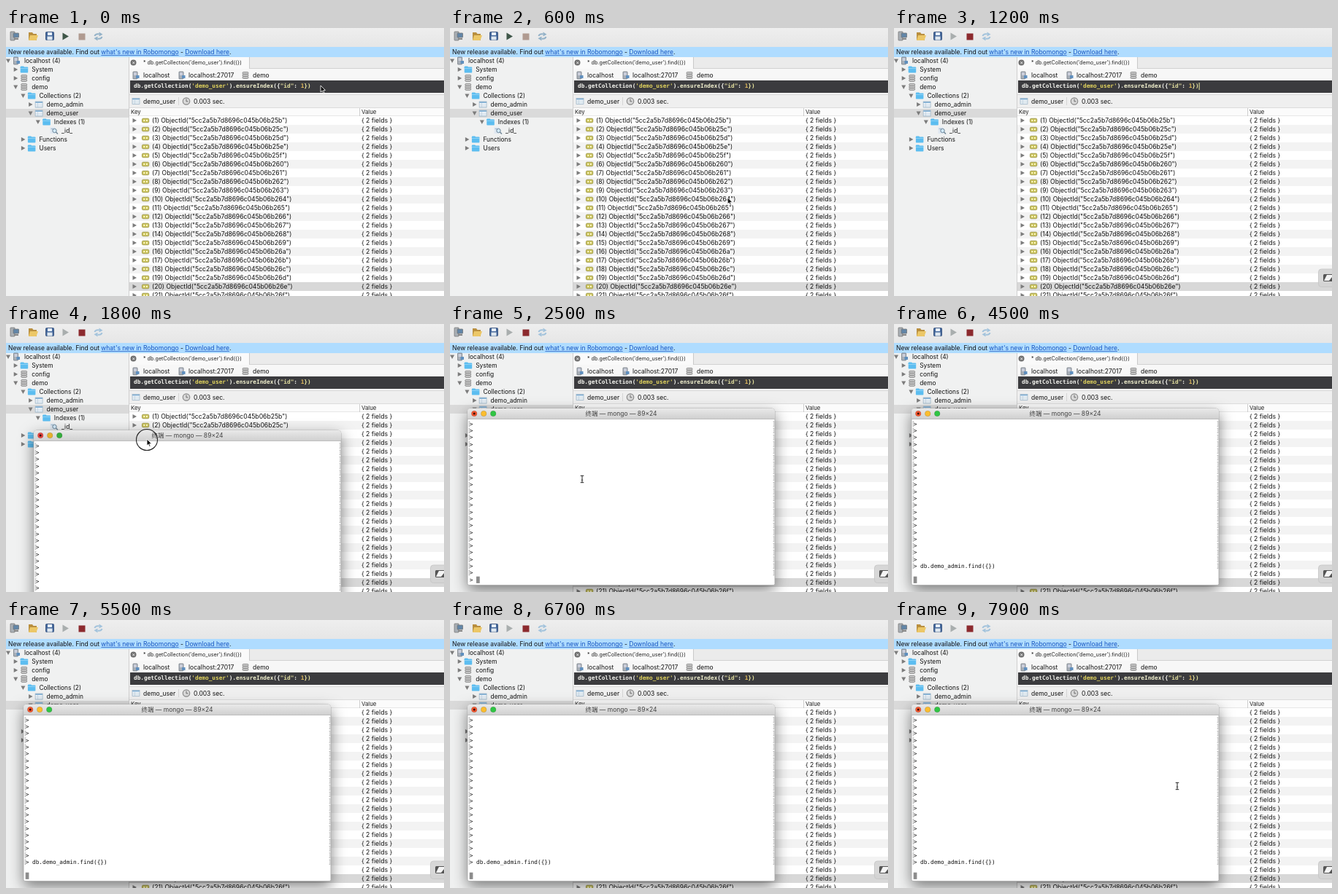
Animation, 600 px wide and 368 px high, one loop 8000 ms. Source, as an HTML page with a canvas:

```html
<!DOCTYPE html>
<html lang="en">
<head>
<meta charset="utf-8">
<style>
  html, body { margin: 0; width: 600px; height: 368px; overflow: hidden; background: #fff; }
  canvas { display: block; }
</style>
</head>
<body>
<canvas id="stage" width="600" height="368"></canvas>
<script>
const ctx = document.getElementById('stage').getContext('2d');
const LOOP = 8000;
const SANS = 'Inter, "Noto Sans CJK SC", "Noto Sans CJK", sans-serif';
const MONO = '"DejaVu Sans Mono", monospace';

function rect(x, y, w, h, color) {
  ctx.fillStyle = color;
  ctx.fillRect(x, y, w, h);
}

function round(x, y, w, h, r, fill, stroke) {
  ctx.beginPath();
  ctx.roundRect(x, y, w, h, r);
  paint(fill, stroke);
}

function circle(x, y, r, fill, stroke, width) {
  ctx.beginPath();
  ctx.arc(x, y, r, 0, 7);
  paint(fill, stroke, width);
}

function poly(points, fill, stroke, width) {
  ctx.beginPath();
  points.forEach(([x, y]) => ctx.lineTo(x, y));
  ctx.closePath();
  paint(fill, stroke, width);
}

function paint(fill, stroke, width = 0.8) {
  if (fill) { ctx.fillStyle = fill; ctx.fill(); }
  if (stroke) { ctx.strokeStyle = stroke; ctx.lineWidth = width; ctx.stroke(); }
}

function vertical(y0, y1, top, bottom) {
  const g = ctx.createLinearGradient(0, y0, 0, y1);
  g.addColorStop(0, top);
  g.addColorStop(1, bottom);
  return g;
}

// Writes a line centred on y and returns its right end.
function text(s, x, y, color = '#111', size = 8.5, family = SANS, weight = '') {
  ctx.font = `${weight} ${size}px ${family}`;
  ctx.fillStyle = color;
  ctx.fillText(s, x, y + size * 0.35);
  return x + ctx.measureText(s).width;
}

function triangle(x, y, open) {
  poly(open ? [[x - 3, y - 2.5], [x + 3, y - 2.5], [x, y + 3]]
            : [[x - 2.5, y - 3], [x + 3, y], [x - 2.5, y + 3]], '#7c7c7c');
}

const icons = {
  folder(x, y, color = '#5cbdf0') {
    round(x - 5, y - 4.5, 5, 3, 1, color);
    round(x - 5, y - 3.5, 10.5, 8, 0.8, color);
    rect(x - 5, y - 2, 10.5, 0.7, 'rgba(255,255,255,.45)');
  },
  server(x, y) {
    round(x - 4, y - 5, 6, 10, 0.6, '#a9b0b8', '#757d86');
    rect(x - 3, y - 3.5, 4, 1, '#eef');
    rect(x - 3, y - 1.5, 4, 1, '#eef');
    rect(x, y, 4.5, 4, '#5f8fbe');
  },
  db(x, y) {
    for (const dy of [2.6, -0.4, -3.4]) round(x - 4, y + dy - 1.2, 8, 3, 1.4, '#c4c4c4', '#858585');
  },
  table(x, y) {
    rect(x - 5, y - 4, 10, 8, '#f3f8fc');
    rect(x - 5, y - 4, 10, 2, '#85b2d6');
    for (let i = 0; i < 3; i++) rect(x - 5, y - 0.3 + i * 2, 10, 0.6, '#b4c8d8');
    rect(x - 2, y - 2, 0.6, 6, '#b4c8d8');
    ctx.strokeStyle = '#9cb4c6';
    ctx.lineWidth = 0.7;
    ctx.strokeRect(x - 5, y - 4, 10, 8);
  },
  index(x, y) {
    rect(x - 5, y - 5, 7, 9, '#dfe8f1');
    rect(x - 4, y - 3, 4, 0.8, '#8aa8c6');
    circle(x + 1, y, 2.7, '#d3ebfb', '#6f8799', 1);
    poly([[x + 3, y + 2], [x + 5.5, y + 4.5]], null, '#6f8799', 1.5);
  },
  tag(x, y) {
    round(x - 4.6, y - 2.8, 9.4, 5.6, 1.5, '#c9c257', '#98924a');
    rect(x - 2.6, y - 1.1, 1.8, 2.2, '#fffbd0');
    rect(x + 1, y - 1.1, 1.8, 2.2, '#fffbd0');
  },
  clock(x, y) {
    circle(x, y, 4.7, '#d9d9d9', '#8a8a8a', 1.2);
    rect(x - 0.4, y - 3, 0.8, 3.4, '#555');
    rect(x, y, 2.4, 0.8, '#555');
  }
};

function toolbar(active) {
  rect(0, 0, 600, 26, vertical(0, 26, '#eeeeee', '#e6e6e6'));
  round(6, 5, 6, 12, 0.6, '#aab0b6', '#777');
  round(10, 7, 7.5, 6, 0.6, '#6286a8', '#777');
  rect(11, 14, 6, 2, '#888');
  poly([[31, 6], [36, 6], [37.5, 8], [42, 8], [42, 17], [31, 17]], '#b98f3f');
  poly([[33, 10], [44, 10], [41.5, 17], [31, 17]], '#ecc767');
  round(54.5, 5.5, 11, 11, 1, '#44679a', '#2c4a77');
  rect(57, 6, 6, 4, '#e8f0fa');
  rect(56.5, 11.5, 7, 5, '#dfe8f0');
  poly([[77.5, 6.5], [86, 11.5], [77.5, 16.5]], active ? '#3f5648' : '#a9aeae');
  rect(99.5, 7.5, 9, 9, active ? '#b09a90' : '#8c2a2e');
  const color = active ? '#94b2c8' : '#a3c3dc';
  for (const s of [1, -1]) {
    ctx.save();
    ctx.translate(126.5, 11.5);
    ctx.scale(s, s);
    ctx.beginPath();
    ctx.moveTo(-5, -0.5);
    ctx.quadraticCurveTo(-4, -4, 1, -3.2);
    paint(null, color, 2);
    poly([[1, -6], [6, -2.8], [1, 0]], color);
    ctx.restore();
  }
}

function notice() {
  rect(0, 26, 600, 14, '#afdcff');
  const link = (s, x) => {
    const end = text(s, x, 32.8, '#1554c0');
    rect(x, 37, end - x, 0.7, '#1554c0');
    return end;
  };
  let x = text('New release available. Find out ', 3, 32.8);
  x = link("what's new in Robomongo", x);
  x = text(' - ', x, 32.8);
  x = link('Download here', x);
  text('.', x, 32.8);
}

// depth, label, icon, state: 1 open, 0 closed, -1 leaf
const tree = [
  [0, 'localhost (4)', 'server', 1],
  [1, 'System', 'folder', 0],
  [1, 'config', 'db', 0],
  [1, 'demo', 'db', 1],
  [2, 'Collections (2)', 'folder', 1],
  [3, 'demo_admin', 'table', 0],
  [3, 'demo_user', 'table', 1],
  [4, 'Indexes (1)', 'folder', 1],
  [5, '_id_', 'index', -1],
  [2, 'Functions', 'folder', 0],
  [2, 'Users', 'folder', 0]
];

function sidebar() {
  rect(0, 40, 168, 328, '#f0f1f1');
  rect(0, 111, 168, 12, '#dadada');
  tree.forEach(([depth, label, icon, state], i) => {
    const x = 3 + depth * 10.2, y = 45 + i * 12;
    if (state >= 0) triangle(x, y, state);
    icons[icon](x + 11.5, y);
    text(label, x + 22, y, '#111', 8.4);
  });
  rect(168, 40, 1, 328, '#cfcfcf');
}

function query(caret) {
  rect(169, 40, 431, 16, '#ebebeb');
  rect(169, 40, 164, 16, '#fafafa');
  rect(333, 40, 0.8, 16, '#c2c2c2');
  rect(333, 55, 267, 0.8, '#cccccc');
  circle(174.5, 47.5, 4, '#707070');
  text('×', 172.2, 47.5, '#fff', 7.5);
  text("* db.getCollection('demo_user').find({})", 188, 47, '#222', 7.2);

  rect(169, 56, 431, 38, '#f7f7f7');
  icons.server(178, 65);
  text('localhost', 188, 65);
  icons.server(241, 65);
  text('localhost:27017', 250, 65);
  icons.db(328, 65);
  text('demo', 338, 65);

  rect(170, 72, 430, 17, '#3b3b3e');
  const code = [
    ['db.getCollection(', '#f6f6f0'], ["'demo_user'", '#e2d45e'], [').', '#f6f6f0'],
    ['ensureIndex', '#f3f2cf'], ['({', '#f6f6f0'], ['"id"', '#e4e0a0'],
    [': ', '#f6f6f0'], ['1', '#e0b95c'], ['})', '#ece9a0']
  ];
  let x = 175;
  for (const [s, color] of code) x = text(s, x, 79.5, color, 7.76, MONO, 'bold');
  if (caret) rect(x, 75, 1, 10, '#e8e8a0');
}

function results() {
  rect(169, 91, 431, 18, '#efefef');
  rect(169, 91, 431, 0.8, '#d2d2d2');
  icons.table(178, 100.5);
  text('demo_user', 188, 100.7);
  rect(236, 95, 0.8, 11, '#d0d0d0');
  icons.clock(247, 100.5);
  text('0.003 sec.', 257, 100.7);

  rect(169, 109, 431, 12, '#fbfbfb');
  rect(169, 109, 431, 0.7, '#d0d0d0');
  rect(169, 120.5, 431, 0.7, '#d4d4d4');
  rect(484, 110, 0.8, 11, '#c6c6c6');
  text('Key', 171, 115, '#222', 7.8);
  text('Value', 487, 115, '#222', 7.8);
  for (let i = 0; i < 21; i++) {
    const y = 127 + i * 12;
    rect(169, y - 6, 431, 12, i === 19 ? '#d8d8d8' : i % 2 ? '#f3f3f3' : '#ffffff');
    triangle(176, y, false);
    icons.tag(191, y);
    const id = '5cc2a5b7d8696c045b06b' + (0x25b + i).toString(16);
    text(`(${i + 1}) ObjectId("${id}")`, 200, y, '#111', 8.65);
    text('{ 2 fields }', 487, y, '#111', 8.65);
  }
}

function badge() {
  round(581.5, 331, 30, 24.5, 4, 'rgba(212,212,212,.9)', '#c4c4c4');
  round(588, 338, 16, 10, 1.5, '#555');
  poly([[593, 339], [600, 339], [600, 342], [596, 347], [589, 347]], '#f4f4f4');
}

function terminal(x, y, dragging, typed, sent) {
  ctx.save();
  ctx.shadowColor = 'rgba(0,0,0,.5)';
  ctx.shadowBlur = 20;
  ctx.shadowOffsetY = 7;
  round(x, y, 421, 242.5, [4, 4, 2, 2], '#fff');
  ctx.restore();
  round(x, y, 421, 242.5, [4, 4, 2, 2], '#fff', '#a8a8a8');
  round(x, y, 421, 14.5, [4, 4, 0, 0], vertical(y, y + 14, '#e9e9e9', '#d0d0d0'));
  rect(x, y + 14, 421, 0.8, '#b3b3b3');

  const lights = dragging ? ['#e8443f', '#e5b02d', '#35ad3c'] : ['#f4572f', '#fbbd2e', '#30c544'];
  lights.forEach((c, i) => circle(x + 9.2 + i * 13, y + 7, 3.8, c, 'rgba(0,0,0,.22)', 0.6));
  circle(x + 9.2, y + 7, 1.5, '#3b0d05');
  const title = '终端 — mongo — 89×24';
  ctx.font = `8.5px ${SANS}`;
  text(title, x + 210.5 - ctx.measureText(title).width / 2, y + 7.2, '#444');

  const mono = (s, col, row, color = '#111') =>
    text(s, x + 2.7 + col * 4.67, y + 21 + row * 9.3, color, 7.76, MONO);
  const bracket = (bx, row, dir) => {
    const by = y + 17.5 + row * 9.3;
    rect(bx, by, 0.7, 7, '#aaa');
    rect(dir > 0 ? bx : bx - 1, by, 1.7, 0.7, '#aaa');
    rect(dir > 0 ? bx : bx - 1, by + 6.5, 1.7, 0.7, '#aaa');
  };
  const last = sent ? 22 : 23;
  for (let row = 0; row < last; row++) {
    bracket(x + 1.8, row, 1);
    bracket(x + 419.5, row, -1);
    mono('>', 0, row);
  }
  const command = 'db.demo_admin.find({})';
  if (sent) mono(command, 2, 21);
  else mono('> ' + command.slice(0, typed), 0, 23);
  const col = sent ? 0 : 2 + typed;
  rect(x + 2.7 + col * 4.67, y + 230.7, 4.7, 9.2, '#8c8c8c');
}

function arrow(x, y) {
  const shape = [[0, 0], [0, 9], [2.1, 7.2], [3.6, 10.4], [5, 9.7], [3.6, 6.7], [6.4, 6.4]];
  poly(shape.map(([a, b]) => [x + a, y + b]), '#111', '#fff', 0.8);
}

function beam(x, y) {
  rect(x - 0.5, y - 4.5, 1, 9, '#222');
  rect(x - 2.3, y - 5.2, 4.6, 1, '#222');
  rect(x - 2.3, y + 4.2, 4.6, 1, '#222');
  rect(x - 1.3, y + 0.8, 2.6, 0.7, '#222');
}

// Eased position along [time, x, y] keys.
function along(keys, t) {
  const i = keys.findIndex(k => k[0] > t);
  if (i < 0) return keys[keys.length - 1].slice(1);
  if (i === 0) return keys[0].slice(1);
  const [t0, x0, y0] = keys[i - 1], [t1, x1, y1] = keys[i];
  const p = (t - t0) / (t1 - t0), e = p * p * (3 - 2 * p);
  return [x0 + (x1 - x0) * e, y0 + (y1 - y0) * e];
}

const windowPath = [[1600, 40, 150], [1800, 38, 146], [2200, 24, 116]];
const leaving = [[300, 431, 79], [900, 330, 385]];
const arriving = [[1300, 230, 385], [1600, 195, 162], [1800, 193, 158], [2200, 179, 128]];
const settling = [[2200, 179, 128], [2450, 181, 213]];
const returning = [[7350, 181, 213], [7800, 388, 228]];

function pointer(t) {
  if (t < 900) arrow(...along(leaving, t));
  else if (t >= 1300 && t < 2200) {
    const [x, y] = along(arriving, t);
    if (t >= 1650) circle(x, y + 1, 14.5, null, '#222', 1.1);
    arrow(x, y);
  } else if (t >= 2200 && t < 2700) beam(...along(settling, t));
  else if (t >= 7350) beam(...along(returning, t));
}

function draw(t) {
  ctx.clearRect(0, 0, 600, 368);
  toolbar(t < 1000);
  notice();
  sidebar();
  query(t >= 900 && t < 1500);
  results();
  if (t >= 1500) {
    const typed = Math.max(0, Math.min(22, Math.floor((t - 2700) / 25)));
    terminal(...along(windowPath, t), t < 2200, typed, t >= 3400);
  }
  if (t >= 1000) badge();
  pointer(t);
}

const start = performance.now();
function tick() {
  draw((performance.now() - start) % LOOP);
  requestAnimationFrame(tick);
}
tick();
</script>
</body>
</html>
```
